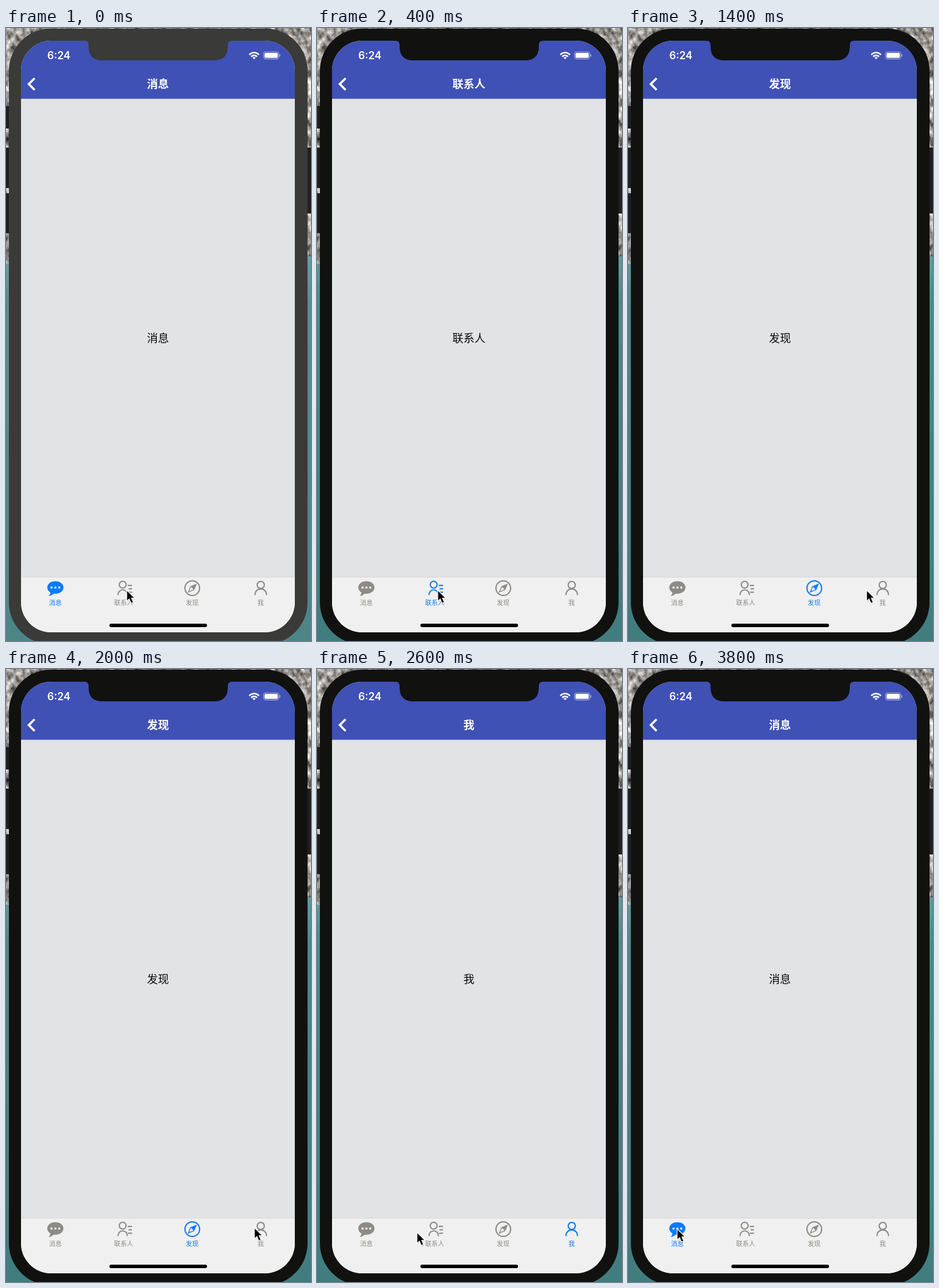
Animation, 528 px wide and 1061 px high, one loop 4 s. Source, as an HTML page:

```html
<!DOCTYPE html>
<html lang="zh-CN">
<head>
<meta charset="utf-8">
<title>消息</title>
<style>
  html, body { margin: 0; width: 100%; height: 100%; overflow: hidden; background: #111; }
  svg { display: block; width: 100%; height: 100%; }
  text { font-family: "Noto Sans CJK SC", "Noto Sans CJK", sans-serif; text-anchor: middle; }
  .clock { font: 600 18px Inter, sans-serif; fill: #fff; }

  .bezel, .sea, .cursor, .tab { animation: 4s step-end infinite; }
  .bezel { fill: #111110; animation-name: bezel; }
  .sea { animation-name: sea; }
  .cursor { animation-name: cursor; }

  .tab { color: #8e8b87; --show: 0; }
  .messages { animation-name: messages; }
  .contacts { animation-name: contacts; }
  .discover { animation-name: discover; }
  .me { animation-name: me; }

  .page { opacity: var(--show); }
  .title { font-size: 19px; font-weight: 700; fill: #fff; }
  .body { font-size: 19px; fill: #080808; }
  .label { font-size: 11px; fill: currentColor; }
  .icon { fill: none; stroke: currentColor; stroke-width: 2.2; }
  .solid { fill: currentColor; stroke: none; }

  @keyframes bezel { 0% { fill: #3a3a38; } 5%, 100% { fill: #111110; } }
  @keyframes sea { 0% { opacity: .88; } 5%, 100% { opacity: 1; } }
  @keyframes messages {
    0%, 80%, 100% { color: #087bff; --show: 1; }
    10% { color: #8e8b87; --show: 0; }
  }
  @keyframes contacts {
    0%, 25%, 100% { color: #8e8b87; --show: 0; }
    10% { color: #147bf0; --show: 1; }
  }
  @keyframes discover {
    0%, 55%, 100% { color: #8e8b87; --show: 0; }
    25% { color: #147bf0; --show: 1; }
  }
  @keyframes me {
    0%, 80%, 100% { color: #8e8b87; --show: 0; }
    55% { color: #147bf0; --show: 1; }
  }
  @keyframes cursor {
    0% { transform: translate(209px, 973px); }
    15% { transform: translate(306px, 987px); }
    20% { transform: translate(328px, 988px); }
    30% { transform: translate(374px, 983px); }
    35% { transform: translate(413px, 973px); }
    40% { transform: translate(428px, 968px); }
    45% { transform: translate(430px, 967px); }
    60% { transform: translate(320px, 975px); }
    65% { transform: translate(173px, 975px); }
    70% { transform: translate(104px, 971px); }
    75%, 100% { transform: translate(85px, 969px); }
  }
</style>
</head>
<body>
<svg viewBox="0 0 528 1061" preserveAspectRatio="none">
  <defs>
    <filter id="rock" x="0" y="0" width="1" height="1" color-interpolation-filters="sRGB">
      <feTurbulence type="fractalNoise" baseFrequency=".09 .07" numOctaves="4" seed="7"/>
      <feColorMatrix values="1.3 0 0 0 -.06  1.3 0 0 0 -.075  1.3 0 0 0 -.095  0 0 0 0 1"/>
    </filter>
    <linearGradient id="water" x2="0" y2="1">
      <stop stop-color="#619b9c"/>
      <stop offset=".12" stop-color="#4b898b"/>
      <stop offset=".5" stop-color="#458386"/>
      <stop offset="1" stop-color="#417d7f"/>
    </linearGradient>
    <clipPath id="screen"><rect x="26" y="22" width="474" height="1024" rx="52"/></clipPath>
  </defs>

  <rect width="528" height="410" filter="url(#rock)"/>
  <path d="M0 408 528 395V1061H0z" fill="#a3c4c3"/>
  <path class="sea" d="M0 408 528 395V1061H0z" fill="url(#water)"/>

  <path d="M0 135h8v39H0zM0 207h8v70H0zM0 286h8v69H0zM518 207h10v114h-10z" fill="#202020"/>
  <rect class="bezel" x="5" y="1" width="517" height="1066" rx="73"/>

  <g clip-path="url(#screen)">
    <rect x="26" y="22" width="474" height="1024" fill="#e2e3e5"/>
    <rect x="26" y="22" width="474" height="100.5" fill="#3f51b5"/>
    <rect x="26" y="950" width="474" height="96" fill="#f0f0f0"/>
    <path d="M26 950.5H500" stroke="#d8d8d8"/>
  </g>
  <path class="bezel" d="M136 21v1q7 0 7 8v2q0 24 24 24h193q24 0 24-24v-2q0-8 7-8v-1z"/>
  <rect x="179" y="1031" width="169" height="6" rx="3"/>

  <text class="clock" x="91.5" y="54">6:24</text>
  <g fill="none" stroke="#fff">
    <path d="M421 46.2q8.5-7.4 17 0M424.3 49.6q5.2-4.3 10.4 0" stroke-width="2.6"/>
    <path d="M426.7 51.2q2.8-2 5.6 0L429.5 54z" fill="#fff" stroke="none"/>
    <rect x="445.8" y="41.2" width="26.4" height="12.4" rx="3.6" stroke="#a8b0dc" stroke-width="1.1"/>
    <rect x="447.5" y="43" width="23" height="8.8" rx="2" fill="#fff" stroke="none"/>
    <path d="M474.2 45.3v4.2" stroke="#a8b0dc" stroke-width="1.4"/>
    <path d="M49.5 87 39.5 97l10 10.3" stroke-width="3.8"/>
  </g>

  <g class="tab messages">
    <g class="page"><text class="title" x="263" y="104">消息</text><text class="body" x="263" y="543.5">消息</text></g>
    <path class="solid" d="M85.5 957.5c8 0 14 4.600 14 10.800s-6 10.900-14 10.900q-1.500 0-3-.2-4 4-9 4 3.500-2.500 3.300-6c-3.300-2-5.300-5-5.300-8.700 0-6.200 6-10.800 14-10.800z"/>
    <path d="M78.800 968.500h.01M85.500 968.500h.01M92.200 968.500h.01" stroke="#f0f0f0" stroke-width="3.800" stroke-linecap="round"/>
    <text class="label" x="85.500" y="999">消息</text>
  </g>

  <g class="tab contacts">
    <g class="page"><text class="title" x="263" y="104">联系人</text><text class="body" x="263" y="543.5">联系人</text></g>
    <g class="icon">
      <circle cx="202" cy="963.5" r="5.900"/>
      <path d="M193.800 981.500c0-5.600 3.500-9 8.200-9s8.200 3.400 8.200 9M210.800 964.800h7.400M212.200 970.700h6M211.200 976.600h7"/>
    </g>
    <text class="label" x="203.800" y="999">联系人</text>
  </g>

  <g class="tab discover">
    <g class="page"><text class="title" x="263" y="104">发现</text><text class="body" x="263" y="543.5">发现</text></g>
    <g class="icon">
      <circle cx="322.500" cy="969.500" r="12.700"/>
      <path d="M329.200 962.800 325.300 972.300 315.800 976.200 319.700 966.700z" stroke-width="1.500"/>
      <path class="solid" d="M329.200 962.800 325.300 972.300 322.500 969.500 319.700 966.700z"/>
    </g>
    <text class="label" x="322.300" y="999">发现</text>
  </g>

  <g class="tab me">
    <g class="page"><text class="title" x="263" y="104">我</text><text class="body" x="263" y="543.5">我</text></g>
    <g class="icon" stroke-width="2">
      <circle cx="441" cy="964" r="6.200"/>
      <path d="M431 981.500c0-6.500 4.200-10.600 10-10.600s10 4.100 10 10.600"/>
    </g>
    <text class="label" x="440.800" y="999">我</text>
  </g>

  <g class="cursor">
    <path d="M1 2V20.500l4-3.600 3.200 7.500 4-1.700L9 15.500h5.500z" fill="#000" opacity=".18"/>
    <path d="M0 0V19.200l4.300-3.900 3.200 7.500 4-1.700-3.200-7.300h5.700z" stroke="#fff" stroke-width="1.300"/>
  </g>
</svg>
</body>
</html>
```
